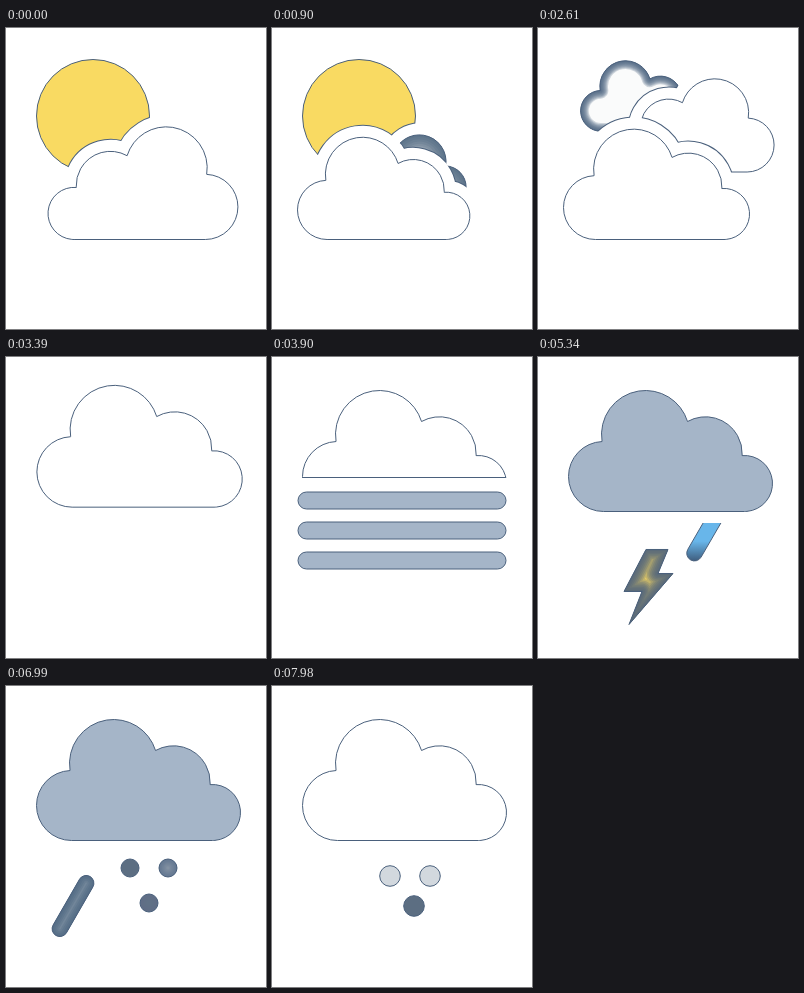
An HTML page with a canvas that plays this animation: 260 by 301 pixels, repeating every 8000 ms.

```html
<!DOCTYPE html>
<html lang="en">
<head>
<meta charset="utf-8">
<title>Weather icons</title>
<style>
  html, body { margin: 0; width: 100%; height: 100%; overflow: hidden; background: #fff; }
  canvas { display: block; width: 260px; height: 301px; }
</style>
</head>
<body>
<canvas id="sky"></canvas>
<script>
const LOOP = 8000, GAP = 12;
const LINE = '#4a607c';
const SLATE = [92, 110, 130], WHITE = [255, 255, 255], GREY = [165, 181, 200];
const YELLOW = [249, 218, 98], BLUE = [104, 182, 234], PALE = [210, 216, 222];
const CENTRE = [123, 122];

const canvas = document.getElementById('sky');
const ctx = canvas.getContext('2d');
const dpr = window.devicePixelRatio || 1;
canvas.width = 260 * dpr;
canvas.height = 301 * dpr;

// Timing helpers
const seg = (t, from, to) => Math.min(1, Math.max(0, (t - from) / (to - from)));
const lerp = (a, b, p) => a + (b - a) * p;
const inBack = (p, c = 1.9) => (c + 1) * p ** 3 - c * p * p;
const outBack = (p, c = 1.7) => 1 - inBack(1 - p, c);
const outCubic = p => 1 - (1 - p) ** 3;
const inOut = p => p < .5 ? 2 * p * p : 1 - 2 * (1 - p) ** 2;

const mix = (a, b, p) => a.map((v, i) => lerp(v, b[i], p));
const rgb = (c, a = 1) => `rgba(${c.map(Math.round).join()},${a})`;

// Scale and shade of a part that pops in and later shrinks away
function life(t, inFrom, inTo, outFrom, outTo, c = 1.9) {
  const a = seg(t, inFrom, inTo), b = seg(t, outFrom, outTo);
  return { s: b > 0 ? 1 - inBack(b, c) : a > 0 ? outBack(a) : 0,
           k: b > 0 ? b * b : (1 - a) ** 2 };
}

// Cloud with its left bottom corner at 0,0 and a width of 204
const puff = new Path2D();
[[35, -35, 35, 35, 0, 33.5, -70],
 [77, -77, 44, 33.5, -70, 119, -90],
 [137, -58, 36.7, 119, -90, 173.5, -56.5],
 [176, -28, 28, 173.5, -56.5, 176, 0]].forEach(([x, y, r, x0, y0, x1, y1]) =>
  puff.arc(x, y, r, Math.atan2(y0 - y, x0 - x), Math.atan2(y1 - y, x1 - x)));
puff.closePath();

function place(c, flip, grow = 1, [px, py] = CENTRE) {
  const s = c.s * grow, x = px + (c.x - px) * grow, y = py + (c.y - py) * grow;
  const path = new Path2D();
  path.addPath(puff, new DOMMatrix([flip ? -s : s, 0, 0, s, flip ? x + 204 * s : x, y]));
  return path;
}

function circle(x, y, r) {
  const path = new Path2D();
  path.arc(x, y, Math.max(0, r), 0, Math.PI * 2);
  return path;
}

function pill(x0, y0, x1, y1, r) {
  const a = Math.atan2(y1 - y0, x1 - x0), path = new Path2D();
  path.arc(x0, y0, r, a + Math.PI / 2, a + Math.PI * 1.5);
  path.arc(x1, y1, r, a - Math.PI / 2, a + Math.PI / 2);
  path.closePath();
  return path;
}

function polygon(points) {
  const path = new Path2D();
  points.forEach(p => path.lineTo(...p));
  path.closePath();
  return path;
}

function stroke(path, width, style) {
  ctx.lineWidth = width;
  ctx.strokeStyle = style;
  ctx.stroke(path);
}

// k moves the fill to slate, from the rim inwards
function shape(path, fill, k = 0) {
  ctx.fillStyle = rgb(mix(fill, SLATE, k ** 3));
  ctx.fill(path);
  if (k > 0.01) {
    ctx.save();
    ctx.clip(path);
    for (let i = 1; i <= 8; i++) stroke(path, 52 * k * i / 8, rgb([72, 96, 124], .25 * (1 - k ** 4)));
    ctx.restore();
  }
  stroke(path, 1, LINE);
}

// Cuts an outlined margin around a path out of everything behind it
function cutOut(path, gap) {
  ctx.globalCompositeOperation = 'source-atop';
  stroke(path, 2 * gap + 1, LINE);
  ctx.globalCompositeOperation = 'destination-out';
  stroke(path, Math.max(0.1, 2 * gap - 1), '#000');
  ctx.fill(path);
  ctx.globalCompositeOperation = 'source-over';
}

function cloud(c, flip, { s, k }, pivot) {
  if (s <= 0.01) return;
  const path = place(c, flip, s, pivot);
  cutOut(path, GAP * Math.min(1, s * 1.5));
  shape(path, WHITE, k);
}

function sun(t) {
  const { s, k } = life(t, -2, -1, 2250, 2560);
  if (s <= 0.01) return;
  const [px, py] = CENTRE;
  shape(circle(px - 36 * s, py - 34 * s, 56.5 * s), YELLOW, k);
}

function backClouds(t) {
  const g = lerp(.925, 1, inOut(seg(t, 1500, 1830)));
  cloud({ x: 45.9, y: 101.3, s: .55 }, false, life(t, 2400, 2880, 3120, 3380, 0), [102, 68]);
  cloud({ x: 25 + 54 * g, y: 212 - 68 * g, s: .77 * g }, true, life(t, 920, 1230, 3120, 3420, 0));
  cloud({ x: 42, y: 211.5, s: .931 }, true, life(t, -2, -1, 600, 963));
}

function frontCloud(t) {
  if (t < 600) return;
  const rise = outBack(seg(t, 3120, 3500));
  const c = {
    x: lerp(lerp(-180, 25.5, outCubic(seg(t, 600, 900))), 30.5, rise),
    y: lerp(211.5, 154.5, rise),
    s: lerp(lerp(.845, .912, inOut(seg(t, 1500, 1830))), 1, rise)
  };
  const path = place(c);
  if (t < 3500) {
    cutOut(path, GAP);
    shape(path, WHITE);
    return;
  }
  // The bottom is cut off straight while the fog lies below it
  const low = inOut(seg(t, 3500, 3780)) - inOut(seg(t, 4400, 4700));
  const cut = 154.5 - 34 * low;
  const grey = seg(t, 4400, 4800) - seg(t, 7530, 7900);
  ctx.save();
  ctx.beginPath();
  ctx.rect(0, 0, 260, cut + .5);
  ctx.clip();
  shape(path, mix(WHITE, GREY, grey));
  ctx.restore();
  if (low > 0) {
    const half = (r, y) => Math.sqrt(Math.max(0, r * r - (cut - y) ** 2));
    const line = new Path2D();
    line.moveTo(65.5 - half(35, 119.5), cut);
    line.lineTo(206.5 + half(28, 126.5), cut);
    stroke(line, 1, LINE);
  }
}

function fog(t) {
  for (let i = 0; i < 3; i++) {
    const a = seg(t, 3420 + i * 100, 3700 + i * 100), b = seg(t, 4350 + i * 40, 4570 + i * 40);
    const w = outCubic(a) * (1 - b ** 3);
    if (w < 0.02) continue;
    const y = 143.5 + 30 * i, h = 95.5 * w, r = 8.5 * Math.min(1, w * 2);
    shape(pill(130 - h, y, 130 + h, y, r), GREY, b > 0 ? b : (1 - a) ** 2);
  }
}

function rain(t) {
  ctx.save();
  ctx.beginPath();
  ctx.rect(0, 166, 260, 135);
  ctx.clip();
  [5100, 5110, 5230].forEach((leave, i) => {
    const a = seg(t, 4430 + i * 60, 4710 + i * 60), b = seg(t, leave, leave + 220);
    if (a <= 0 || b >= 1) return;
    const y = 239 - 84 * (1 - outCubic(a) + inOut(b));
    const x = 174 - 33 * (2 - i) - (y - 166) * .58;
    const path = pill(x + 58, y - 100, x, y, 7.7);
    const fade = ctx.createLinearGradient(0, y - 12, 0, y + 8);
    fade.addColorStop(0, rgb(BLUE));
    fade.addColorStop(1, rgb(mix(BLUE, [62, 92, 124], Math.max(1 - a, Math.min(1, b * 2)))));
    ctx.fillStyle = fade;
    ctx.fill(path);
    stroke(path, 1, LINE);
  });
  ctx.restore();
}

function bolt(t) {
  const { s, k } = life(t, 5160, 5760, 5910, 6200);
  if (s <= 0.01) return;
  const q = s * 1.1;
  const points = [[-2, -37], [20, -37], [10, -13], [25, -13], [-19, 38], [-6, 5], [-24, 5]];
  shape(polygon(points.map(([x, y]) => [110 + x * q, 229.5 + y * q])), YELLOW, k);
}

function sleet(t) {
  for (let i = 0; i < 3; i++) {
    const from = i ? 6720 : 6760;
    const { s, k } = life(t, 6080 + i * 90, 6500 + i * 90, from, i ? 6980 : 7075);
    if (s <= 0.01) continue;
    const x = 67 + 45 * i;
    shape(pill(x + 15 * s, 220 - 26 * s, x - 15 * s, 220 + 26 * s, 8.8 * s), PALE, k);
  }
}

function snow(t) {
  const p = inOut(seg(t, 7000, 7480));
  [[124, 182, 118, 190, 7000], [162, 182, 158, 190, 6930], [143, 217, 142, 220, 6985]]
    .forEach(([x0, y0, x1, y1, clear], i) => {
      const a = seg(t, 6800 + i * 30, 6930 + i * 30);
      if (a <= 0) return;
      let k = 1 - seg(t, clear, clear + 420);
      if (i === 2) k = Math.max(k, seg(t, 7720, 7970));
      shape(circle(lerp(x0, x1, p), lerp(y0, y1, p), outCubic(a) * lerp(9, 10.3, p)), PALE, k);
    });
}

function draw(t) {
  ctx.setTransform(dpr, 0, 0, dpr, 0, 0);
  ctx.clearRect(0, 0, 260, 301);
  ctx.lineJoin = 'round';
  [sun, backClouds, frontCloud, fog, rain, bolt, sleet, snow].forEach(part => part(t));
}

const start = performance.now();
function tick() {
  draw((performance.now() - start) % LOOP);
  requestAnimationFrame(tick);
}
tick();
</script>
</body>
</html>
```
